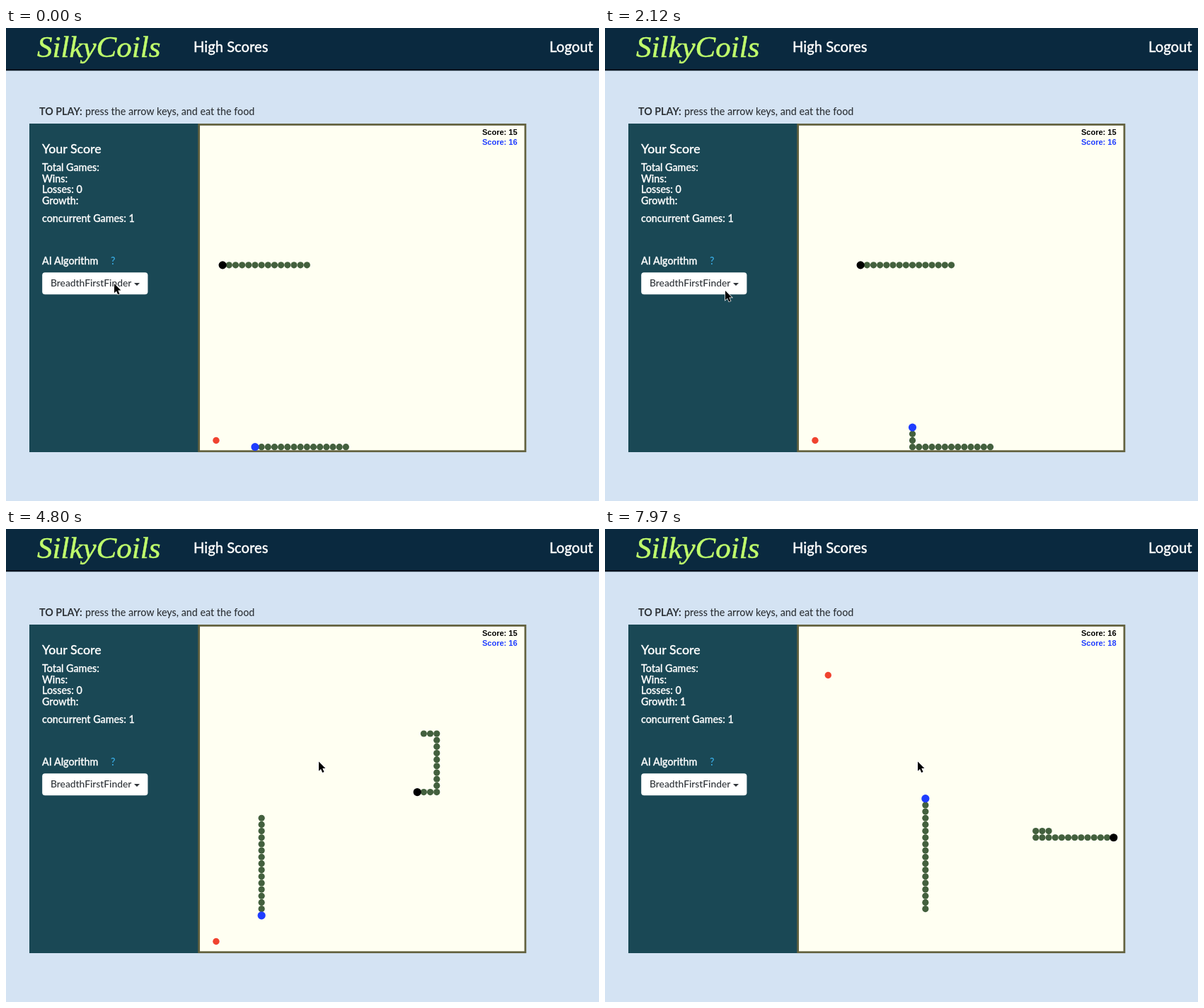
An HTML page for the animation above (8000 ms loop, 838 px wide and 668 px high).

```html
<!DOCTYPE html>
<html lang="en">
<head>
<meta charset="utf-8">
<title>Snake game</title>
<style>
html, body { margin: 0; width: 100%; height: 100%; overflow: hidden; background: #d4e3f3; }
svg { display: block; width: 100%; height: 100%; }
text { font: 500 14.3px Lato, "Open Sans", sans-serif; fill: #fff; stroke: #fff; stroke-width: .3; }
.logo { font: italic 43px "Liberation Serif", serif; fill: #c1ff6c; stroke: #c1ff6c; stroke-width: .5; }
.nav { font-size: 20.2px; }
.title { font-size: 17.8px; }
.dark { fill: #2e3338; stroke: none; }
.help { fill: #3bb0ea; stroke: none; }
.score { font: bold 11px "Liberation Sans", Arial, sans-serif; stroke: none; }
</style>
</head>
<body>
<svg viewBox="0 0 838 668">
  <rect width="838" height="668" fill="#d4e3f3"/>
  <rect width="838" height="60" fill="#0a293f"/>
  <rect y="58" width="838" height="2" fill="#04131f"/>
  <rect y="60" width="838" height="1" fill="#04131f" opacity=".3"/>
  <text class="logo" x="44" y="41">SilkyCoils</text>
  <text class="nav" x="265" y="34">High Scores</text>
  <text class="nav" x="768" y="34">Logout</text>
  <text class="dark" x="47" y="123"><tspan font-weight="700">TO PLAY:</tspan></text>
  <text class="dark" x="112" y="123">press the arrow keys, and eat the food</text>

  <rect x="33" y="135" width="240" height="464" fill="#1a4855"/>
  <text class="title" x="51" y="177">Your Score</text>
  <text x="51" y="202">Total Games:</text>
  <text x="51" y="217.5">Wins:</text>
  <text x="51" y="233">Losses: 0</text>
  <text x="51" y="249" id="growth">Growth:</text>
  <text x="51" y="273.5">concurrent Games: 1</text>
  <text x="51" y="334">AI Algorithm</text>
  <text class="help" x="148" y="334">?</text>
  <rect x="51.2" y="345.2" width="149.2" height="31" rx="4" fill="#fff"/>
  <text class="dark" x="63" y="365.3" style="font-size:13.8px">BreadthFirstFinder</text>
  <path d="M181 360h8l-4 4z" fill="#2e3338"/>

  <rect x="272.65" y="136.4" width="461.25" height="461.3" fill="#fffff2" stroke="#63623f" stroke-width="2.75"/>
  <text class="score" x="673" y="151" style="fill:#000" id="score0"></text>
  <text class="score" x="673" y="165" style="fill:#1f3dff" id="score1"></text>
  <g id="board"></g>
  <path id="cursor" d="M0 0V13.2L3 10.4L5.2 15.4L7.5 14.4L5.3 9.6H9.4Z" fill="#000" stroke="#fff" stroke-width="1.4" paint-order="stroke"/>
</svg>
<script>
const LOOP = 8000, CELLS = 50, STEP = 9.17, HISTORY = 20;
const DIRS = { L: [-1, 0], R: [1, 0], U: [0, -1], D: [0, 1] };
const $ = id => document.getElementById(id);
const wrap = v => (v + CELLS) % CELLS;

// [time, moves made]
const PACE = [[0, .4], [30, 1], [820, 17], [2120, 44], [3921, 81], [5640, 116], [6730, 139], [7970, 164]];
// [first move, column, row]
const FOOD = [[0, 2, 48], [109, 34, 48], [127, 43, 27], [140, 4, 7]];
// [time, x, y]
const MOUSE = [[0, 153, 361], [60, 153, 361], [360, 170, 371], [2650, 170, 371], [3150, 442, 328.5]];

function circle(r, fill) {
  const c = document.createElementNS("http://www.w3.org/2000/svg", "circle");
  c.setAttribute("r", r);
  c.setAttribute("fill", fill);
  return $("board").appendChild(c);
}

function place(c, [x, y]) {
  c.setAttribute("cx", 278.6 + x * STEP);
  c.setAttribute("cy", 142.3 + y * STEP);
}

function walk(x, y, route) {
  const cells = [[x, y]];
  for (const leg of route.split(" ")) {
    const [dx, dy] = DIRS[leg[0]];
    for (let i = +leg.slice(1); i > 0; i--) {
      x = wrap(x + dx);
      y = wrap(y + dy);
      cells.push([x, y]);
    }
  }
  return cells;
}

function snake(x, y, route, color, score, meals) {
  const body = Array.from({ length: 17 }, () => circle(4.6, "#43603e"));
  return { cells: walk(x, y, route), parts: [circle(5.6, color), ...body], score, meals };
}

function lerp(points, t, k) {
  const i = points.findIndex(p => p[0] > t);
  if (i < 0) return points[points.length - 1][k];
  const a = points[i - 1], b = points[i];
  return a[k] + (b[k] - a[k]) * (t - a[0]) / (b[0] - a[0]);
}

const food = circle(4.7, "#f0432f");
const snakes = [
  snake(23, 21, "L94 U5 R7 D9 L43 D6 L7 D1 R12", "#000", 15, [140]),
  snake(28, 49, "L61 U27 L8 D26 L40 U22", "#1f3dff", 16, [109, 127])
];

function draw(t) {
  const move = Math.floor(lerp(PACE, t, 1) + 1e-6);
  // the tail cell is sometimes cleared ahead of the head
  const cleared = t < 400 || (t > 4900 && t < 7000) ? 1 : 0;
  snakes.forEach((s, k) => {
    const score = s.score + s.meals.filter(m => m <= move).length;
    s.parts.forEach((c, i) => {
      c.style.display = i < score - cleared ? "" : "none";
      place(c, s.cells[Math.max(0, HISTORY + move - i)]);
    });
    $("score" + k).textContent = "Score: " + score;
  });
  place(food, FOOD.filter(f => f[0] <= move).pop().slice(1));
  $("growth").textContent = move < 140 ? "Growth:" : "Growth: 1";
  $("cursor").setAttribute("transform", `translate(${lerp(MOUSE, t, 1)} ${lerp(MOUSE, t, 2)})`);
}

const start = performance.now();
function tick() {
  draw((performance.now() - start) % LOOP);
  requestAnimationFrame(tick);
}
tick();
</script>
</body>
</html>
```
